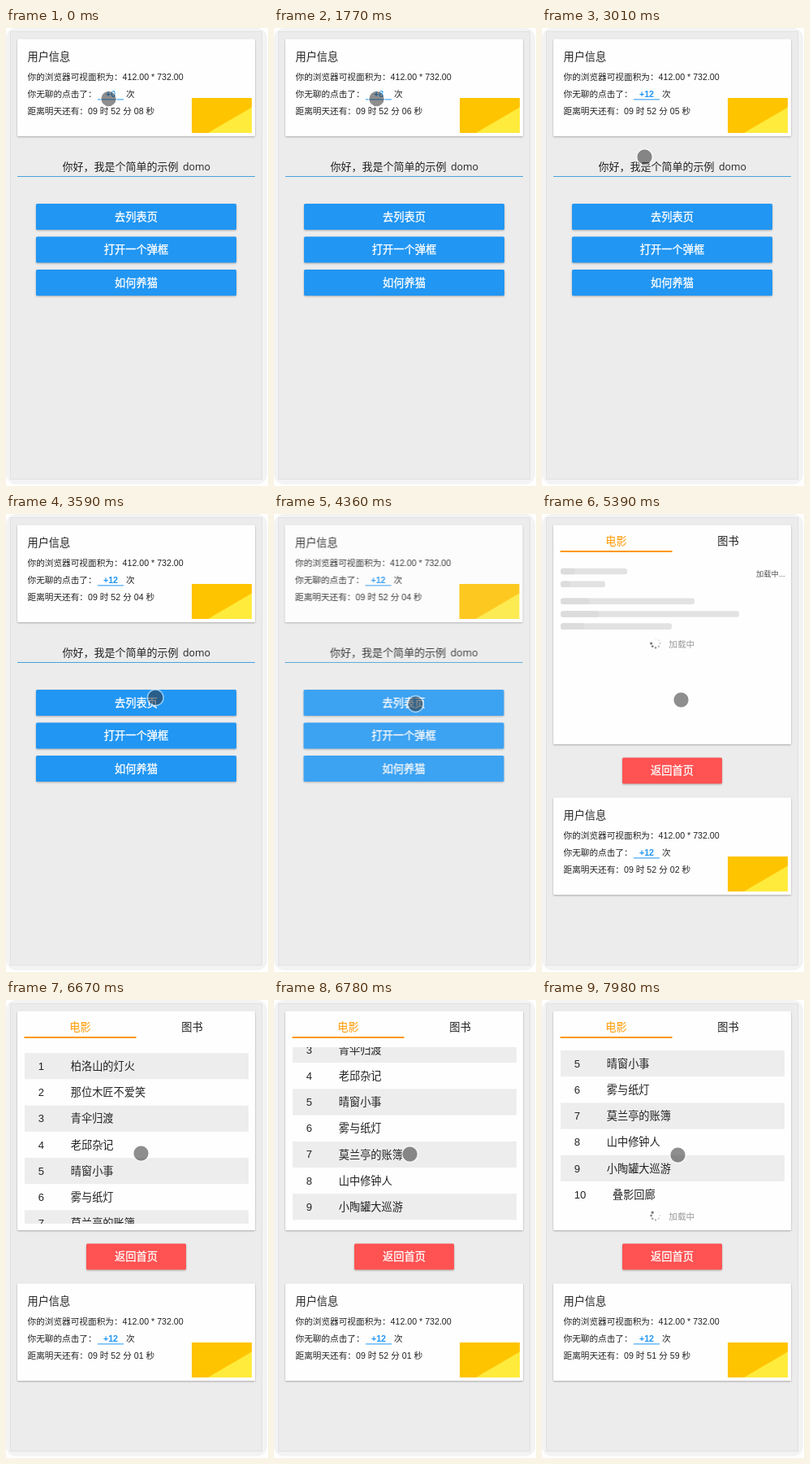
These frames come from a looping animation (323 px wide and 563 px high, 8000 ms). An HTML page:

```html
<!DOCTYPE html>
<html lang="zh-CN">
<head>
<meta charset="utf-8">
<style>
  html, body { margin: 0; width: 100%; height: 100%; overflow: hidden; background: #fff; }
  svg { display: block; width: 323px; height: 563px; }
  text { font-family: "Liberation Sans", "Noto Sans CJK SC", sans-serif; white-space: pre; }
  .card { fill: #fefefe; filter: drop-shadow(0 1px 1px rgba(0, 0, 0, .28)); }
  .button { filter: drop-shadow(0 1px .8px rgba(0, 0, 0, .28)); }
  .caption { fill: #fff; stroke: #fff; stroke-width: .3px; }
</style>
</head>
<body>
<svg id="stage" viewBox="0 0 323 563"></svg>
<script>
const LOOP = 8000;
const BLUE = '#2196f3', ORANGE = '#ff9800', RED = '#ff5252';
const ROW = 32.2, ROW_TOP = 65.2, SCROLL_END = 132;
const SPIN = 829;

const clickTimes = [250, 740, 920, 1070, 1260, 1440, 1590, 1770, 1920, 2070, 2280, 2430];
const tickTimes = [340, 1350, 2520, 3450, 4450, 5090, 5990, 6890, 7790];
const cursorPath = [
  [0, 126.5, 87], [2700, 126.5, 87], [3010, 126.5, 158.5], [3220, 152, 192], [3450, 194, 217],
  [3530, 194, 218], [3650, 174.5, 233.5], [5190, 174.5, 233.5], [5390, 171.5, 228.5],
  [5900, 166.5, 188.5], [6670, 166.5, 188.5], [6780, 167.5, 189.5], [7500, 167.5, 190.5]
];
const titles = ['柏洛山的灯火', '那位木匠不爱笑', '青伞归渡', '老邱杂记', '晴窗小事',
  '雾与纸灯', '莫兰亭的账簿', '山中修钟人', '小陶罐大巡游', '叠影回廊'];

const clamp = v => Math.max(0, Math.min(1, v));
const easeOut = u => 1 - (1 - u) ** 3;
const progress = (t, start, length) => clamp((t - start) / length);
const passed = (times, t) => times.filter(time => time <= t).length;

// y is the vertical middle of the line
const label = (x, y, size, str, attrs = '') =>
  `<text x="${x}" y="${y + size * .355}" font-size="${size}" fill="#212121" ${attrs}>${str}</text>`;
const rect = (x, y, w, h, fill, attrs = '') =>
  `<rect x="${x}" y="${y}" width="${w}" height="${h}" fill="${fill}" ${attrs}/>`;
const card = (y, h) => rect(14, y, 293, h, '#fefefe', 'rx="1" class="card"');
const centered = 'text-anchor="middle"';

const button = (x, y, w, fill, str) =>
  rect(x, y, w, 32, fill, 'rx="1.5" class="button"') +
  label(160.5, y + 16, 13.25, str, `${centered} class="caption"`);

const userCard = dy => `<g transform="translate(0 ${dy})">
  ${card(13.5, 119.5)}
  ${label(26.5, 35, 13.2, '用户信息')}
  ${label(26.5, 60, 10.65, '你的浏览器可视面积为：412.00 * 732.00')}
  ${label(26.5, 81, 10.65, '你无聊的点击了：')}
  ${label(129, 81, 10.65, '', `${centered} class="count" style="fill:${BLUE};font-weight:bold"`)}
  ${rect(113, 87.4, 32, 1, BLUE)}
  ${label(148, 81, 10.65, '次')}
  ${label(26.5, 102, 10.65, '', 'class="clock"')}
  ${rect(229, 86, 74, 43, '#ffc400')}
  <path d="M249 129L303 97.5V129Z" fill="#ffeb3b"/>
</g>`;

const spinner = y => `<g transform="translate(140 ${y})" class="spinner">
  ${Array.from({ length: 8 }, (_, i) => {
    const a = i * Math.PI / 4;
    return `<circle cx="${5.4 * Math.cos(a)}" cy="${5.4 * Math.sin(a)}" fill="#777"/>`;
  }).join('')}</g>
  ${label(156.3, y + .8, 10.65, '加载中', 'style="fill:#999"')}`;

const bone = (y, w) =>
  rect(23, y, w, 7.6, '#e2e2e2', 'rx="3"') + rect(23, y, w * .215, 7.6, '#dcdcdc', 'rx="3"');

const listRow = (title, i) => {
  const y = ROW_TOP + i * ROW;
  return (i % 2 ? '' : rect(23, y, 276, ROW, '#ededed')) +
    label(39.8, y + 16.1, 13, i + 1) + label(i < 9 ? 79.8 : 87, y + 16.1, 13.2, title);
};

const stage = document.getElementById('stage');
stage.innerHTML = `
<defs>
  <clipPath id="screen"><rect x="6" y="5" width="309.5" height="549"/></clipPath>
  <clipPath id="listArea"><rect x="14" y="58" width="293" height="217"/></clipPath>
</defs>
${rect(0, 0, 322, 561, '#f3f3f3', 'rx="13"')}
${rect(5.5, 4.5, 310, 550, '#ececec', 'stroke="#e1e1e1"')}
<g clip-path="url(#screen)">
  <g id="home">
    ${userCard(0)}
    ${label(69.5, 170.5, 13, '你好，我是个简单的示例')}
    ${label(218, 170.5, 12.4, 'domo', 'style="font-family:\'Open Sans\',sans-serif"')}
    ${rect(14, 182, 293, 1, '#45a3dc')}
    ${button(37, 216, 247, BLUE, '去列表页')}
    ${button(37, 256.5, 247, BLUE, '打开一个弹框')}
    ${button(37, 297, 247, BLUE, '如何养猫')}
  </g>
  <g id="list">
    ${card(13.5, 269.5)}
    ${label(91.5, 33, 13.2, '电影', `${centered} style="fill:${ORANGE}"`)}
    ${label(229.5, 33, 13.2, '图书', centered)}
    ${rect(22.5, 45, 138, 2, ORANGE)}
    <g id="skeleton">
      ${bone(66.7, 82)}${bone(82.5, 55)}${bone(103.5, 165)}${bone(119.2, 220)}${bone(134.3, 137)}
      ${label(264, 73.5, 9.3, '加载中...', 'style="fill:#555;font-weight:500"')}
      ${spinner(159)}
    </g>
    <g clip-path="url(#listArea)"><g id="rows">
      ${titles.map(listRow).join('')}
      ${spinner(265 + SCROLL_END)}
    </g></g>
    ${button(99, 299.5, 123, RED, '返回首页')}
    ${userCard(335)}
  </g>
</g>
<g id="cursor">
  <circle r="9.2" fill="#323232" fill-opacity=".55"/>
  <circle r="9.9" fill="none" stroke="#fff" stroke-opacity=".5" stroke-width="1.5"/>
</g>`;

const el = id => document.getElementById(id);
const home = el('home'), list = el('list'), skeleton = el('skeleton'), rows = el('rows'), cursor = el('cursor');
const counts = document.querySelectorAll('.count');
const clocks = document.querySelectorAll('.clock');
const spinners = document.querySelectorAll('.spinner');

const place = (node, x, y) => node.setAttribute('transform', `translate(${x} ${y})`);
const fade = (node, opacity) => {
  node.style.opacity = opacity;
  node.style.display = opacity > 0 ? '' : 'none';
};
const pad = n => String(n).padStart(2, '0');

function cursorAt(t) {
  const next = cursorPath.findIndex(key => key[0] > t);
  if (next < 0) return cursorPath.at(-1).slice(1);
  const [t0, x0, y0] = cursorPath[next - 1], [t1, x1, y1] = cursorPath[next];
  const u = (t - t0) / (t1 - t0);
  return [x0 + (x1 - x0) * u, y0 + (y1 - y0) * u];
}

function render(t) {
  const seconds = 52 * 60 + 8 - passed(tickTimes, t);
  const clock = `距离明天还有：09 时 ${pad(Math.floor(seconds / 60))} 分 ${pad(seconds % 60)} 秒`;
  counts.forEach(node => node.textContent = '+' + passed(clickTimes, t));
  clocks.forEach(node => node.textContent = clock);

  const leave = t < 4360 ? 0 : progress(t, 4308, 400);
  const enter = easeOut(progress(t, 4730, 430));
  fade(home, 1 - leave);
  place(home, -30 * leave ** 2, 0);
  fade(list, enter);
  place(list, 30 * (1 - enter), 0);

  const loaded = progress(t, 6000, 420);
  fade(skeleton, 1 - loaded);
  fade(rows, loaded);
  place(rows, 0, -SCROLL_END * easeOut(progress(t, 6670, 380)));

  // the head dot runs clockwise, the others shrink and fade behind it
  const head = t / SPIN * 8;
  spinners.forEach(group => [...group.children].forEach((dot, i) => {
    const strength = 1 - (((head - i) % 8 + 8) % 8) / 8;
    dot.setAttribute('r', .5 + strength * 1.1);
    dot.setAttribute('opacity', strength ** 1.3);
  }));

  place(cursor, ...cursorAt(t));
}

let start;
function loop(now) {
  start ??= now;
  render((now - start) % LOOP);
  requestAnimationFrame(loop);
}
render(0);
requestAnimationFrame(loop);
</script>
</body>
</html>
```
